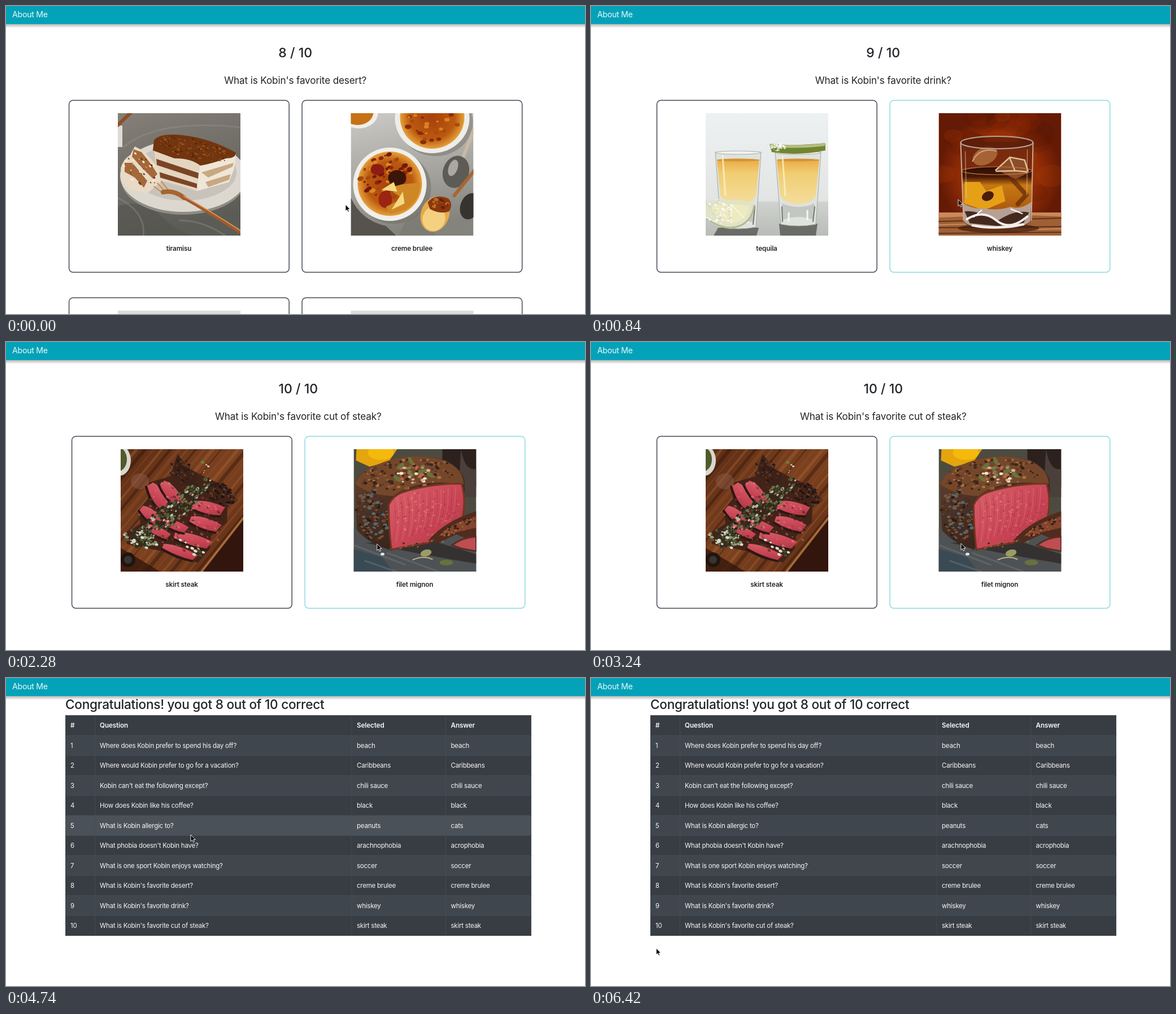
Recreate the animation shown at these times as an HTML page. Size 1025 by 546 pixels, loop 6.48 s.

```html
<!DOCTYPE html>
<html lang="en">
<head>
<meta charset="utf-8">
<title>Quiz</title>
<style>
html, body { margin: 0; width: 100%; height: 100%; overflow: hidden; background: #fff; }
svg { display: block; }
text { font: 400 11.5px Inter, Roboto, sans-serif; letter-spacing: -.02em; fill: #212529; }
.brand { font-size: 14.2px; fill: #e9f8fa; }
.big { font-size: 22.65px; font-weight: 500; letter-spacing: -.012em; }
.count { font-size: 23.1px; letter-spacing: 0; }
.ask { font-size: 17.2px; letter-spacing: -.01em; }
.bold { font-size: 11.7px; font-weight: 600; letter-spacing: -.01em; }
.mid { text-anchor: middle; }
.table text { fill: #f6f7f8; }
.card { fill: #fff; stroke: #474b57; stroke-width: 1.5; }
.card.hover { stroke: #90d9e2; }
</style>
</head>
<body>
<svg id="stage" width="1025" height="546" viewBox="0 0 1025 546">
  <defs>
    <clipPath id="photo"><rect width="217" height="217"/></clipPath>
    <linearGradient id="shade" x2="0" y2="1"><stop stop-color="#000" stop-opacity=".3"/><stop offset="1" stop-color="#000" stop-opacity="0"/></linearGradient>
    <linearGradient id="linen" x2=".3" y2="1"><stop stop-color="#858078"/><stop offset="1" stop-color="#5c5c57"/></linearGradient>
    <linearGradient id="marble" x2=".2" y2="1"><stop stop-color="#cbcac6"/><stop offset=".6" stop-color="#a3a29d"/><stop offset="1" stop-color="#84837c"/></linearGradient>
    <linearGradient id="studio" x2="0" y2="1"><stop stop-color="#eef1f1"/><stop offset=".7" stop-color="#e2e5e4"/><stop offset="1" stop-color="#a9aca8"/></linearGradient>
    <linearGradient id="gold" x2="0" y2="1"><stop stop-color="#e8ad45"/><stop offset=".3" stop-color="#f0cd72"/><stop offset="1" stop-color="#f4dd9c"/></linearGradient>
    <radialGradient id="ember"><stop stop-color="#b03c08"/><stop offset=".6" stop-color="#962f06"/><stop offset="1" stop-color="#641a05"/></radialGradient>
    <radialGradient id="sugar"><stop stop-color="#a8400c"/><stop offset=".7" stop-color="#bb590f"/><stop offset="1" stop-color="#e5a03a"/></radialGradient>
    <linearGradient id="amber" x2="0" y2="1"><stop stop-color="#2a0c05"/><stop offset=".22" stop-color="#4a1907"/><stop offset=".4" stop-color="#c87812"/><stop offset="1" stop-color="#a9560c"/></linearGradient>
    <linearGradient id="board" x2="1" y2="1"><stop stop-color="#5b2c16"/><stop offset=".5" stop-color="#7c4220"/><stop offset="1" stop-color="#5a2b15"/></linearGradient>
    <linearGradient id="rare" x2="1" y2="1"><stop stop-color="#d9606a"/><stop offset=".6" stop-color="#c74354"/><stop offset="1" stop-color="#a63a40"/></linearGradient>
    <linearGradient id="crust" x2=".6" y2="1"><stop stop-color="#6b4630"/><stop offset=".5" stop-color="#4a3024"/><stop offset="1" stop-color="#32211a"/></linearGradient>
  </defs>
</svg>
<script>
const LOOP = 6480, ROW = 35.45, WHO = 'Kobin';
const stage = document.getElementById('stage');

let seed = 7;
const rnd = () => (seed = seed * 16807 % 2147483647) / 2147483647;

const path = (d, fill, more = '') => `<path d="${d}" fill="${fill}" ${more}/>`;
const line = (d, color, width, more = '') => path(d, 'none', `stroke="${color}" stroke-width="${width}" stroke-linecap="round" ${more}`);
const oval = (x, y, rx, ry, fill, more = '') => `<ellipse cx="${x}" cy="${y}" rx="${rx}" ry="${ry}" fill="${fill}" ${more}/>`;
const rect = (x, y, w, h, fill, more = '') => `<rect x="${x}" y="${y}" width="${w}" height="${h}" fill="${fill}" ${more}/>`;
const text = (x, y, s, cls = '') => `<text x="${x}" y="${y}" class="${cls}">${s}</text>`;
const turn = (deg, x, y) => `transform="rotate(${deg} ${x} ${y})"`;

// Crumbs scattered over a rotated ellipse
function crumbs(n, x, y, rx, ry, deg, size, colors) {
  let s = '';
  while (n--) {
    const a = rnd() * 6.283, q = Math.sqrt(rnd()), r = size * (.5 + rnd());
    s += oval((x + rx * q * Math.cos(a)).toFixed(1), (y + ry * q * Math.sin(a)).toFixed(1),
      r.toFixed(1), (r * .7).toFixed(1), colors[n % colors.length]);
  }
  return `<g ${turn(deg, x, y)}>${s}</g>`;
}

const photos = {
  tiramisu: () => rect(0, 0, 217, 217, 'url(#linen)')
    + path('M0 165Q45 150 80 185T150 217H0Z', '#54544e', 'opacity=".6"')
    + line('M10 60Q70 10 217 25M0 150Q50 175 45 217M110 190Q150 190 190 217', '#9a968c', 3, 'opacity=".35"')
    + rect(0, 22, 8, 38, '#dedbd6') + line('M-2 23L24 -2', '#8d4f25', 6)
    + oval(116, 118, 110, 62, '#8f8c85') + oval(116, 111, 112, 64, '#dcd8d0') + oval(118, 105, 92, 50, '#c8c3ba')
    + path('M64 62L146 86L140 138L118 131L70 118Z', '#e4d5bf')
    + path('M146 86L209 72L206 98L197 122L140 138Z', '#efe6d8')
    + path('M68 81L143 106L142 116L69 92ZM72 104L140 125V133L74 114Z', '#7a4526')
    + path('M148 105L205 88L203 95L160 114ZM155 122L200 108L197 118L160 131Z', '#c9a781')
    + path('M64 48Q72 37 100 38Q155 40 209 70Q209 80 192 80Q165 90 146 93Q130 80 100 80L62 66Z', '#71350f')
    + crumbs(130, 134, 63, 66, 17, 13, 1.5, ['#8d4a19', '#54250a', '#a05a22'])
    + path('M5 98Q9 82 22 74L30 59L44 66L56 78L73 99L76 122L52 142L22 136L8 122Z', '#e8dac4')
    + path('M28 64L42 69L60 92L70 108L62 116L42 96L25 77ZM12 88L26 88L52 120L46 132L30 114L12 104Z', '#a4683a')
    + crumbs(30, 40, 100, 34, 25, 40, 1.8, ['#6f3a18', '#f5ecdd'])
    + line('M64 130L80 142M70 124L84 139M77 121L90 137', '#c98d55', 2)
    + line('M80 140Q100 136 117 150', '#a66430', 8) + line('M114 148Q165 177 220 213', '#a45a28', 6)
    + line('M116 147Q165 174 217 208', '#d99a62', 1.5),

  brulee: () => rect(0, 0, 217, 217, 'url(#marble)')
    + path('M0 150Q18 190 62 200L80 217H0Z', '#55534c') + path('M95 195L130 170L150 217H85Z', '#7a7972', 'opacity=".7"')
    + oval(14, 0, 34, 27, '#f0eeea') + oval(12, -2, 28, 23, '#c67116')
    + oval(150, 16, 66, 60, '#77756f', 'opacity=".55"') + oval(144, 9, 66, 62, '#efede9') + oval(144, 7, 57, 56, 'url(#sugar)')
    + crumbs(45, 144, 15, 48, 42, 0, 4, ['#8a2c08', '#d98220', '#a84b0d'])
    + oval(76, 132, 66, 64, '#716f68', 'opacity=".55"') + oval(69, 126, 65, 65, '#f1efeb') + oval(69, 125, 57, 57, 'url(#sugar)')
    + crumbs(70, 60, 112, 47, 40, -20, 4, ['#8e230c', '#d88923', '#a34a0c', '#741908'])
    + oval(82, 115, 16, 14, '#3b1508') + oval(47, 100, 12, 10, '#8d1c12') + oval(61, 153, 12, 15, '#9b2413')
    + path('M72 131L91 126L123 123Q123 154 97 171L70 178L62 166L92 151L76 141Z', '#cf8725')
    + path('M76 122L82 139L54 136ZM92 139L95 160L72 171Z', '#f4d980')
    + line('M196 85L218 28', '#c9b9a2', 6) + oval(186, 104, 23, 29, '#5c5b55', turn(18, 186, 104)) + oval(181, 97, 8, 15, '#aaa8a0', turn(20, 181, 97))
    + line('M183 146L220 100', '#a76635', 6) + oval(211, 165, 17, 24, '#37342f', turn(20, 211, 165))
    + oval(149, 179, 25, 32, '#e6a949', turn(20, 149, 179)) + oval(147, 187, 20, 22, '#f3d181', turn(20, 147, 187))
    + path('M136 158Q148 142 172 151Q182 160 174 174Q158 180 140 170Z', '#8b3710')
    + crumbs(14, 158, 161, 17, 9, 15, 3, ['#6a210b', '#c26c21']),

  tequila: () => {
    const glass = (x, floor) => path(`M${x} 69H${x + 81}L${x + 72} ${floor}Q${x + 41} ${floor + 6} ${x + 10} ${floor}Z`, '#dfe2dd', 'stroke="#a4a8a3"')
      + path(`M${x + 3} 83H${x + 78}L${x + 72} 145Q${x + 66} 161 ${x + 41} 161T${x + 9} 145Z`, 'url(#gold)')
      + oval(x + 40.5, 83, 38, 2.5, '#d69334')
      + path(`M${x + 12} 160Q${x + 41} 172 ${x + 70} 160L${x + 68} ${floor - 8}Q${x + 41} ${floor - 18} ${x + 14} ${floor - 8}Z`, '#c3c7c3')
      + line(`M${x + 12} 166L${x + 13} ${floor - 5}M${x + 70} 166L${x + 67} ${floor - 5}`, '#737875', 2)
      + line(`M${x + 24} ${floor - 20}V${floor - 6}M${x + 57} ${floor - 24}V${floor - 8}`, '#f5f6f4', 3)
      + oval(x + 40.5, 70, 40, 3, '#f0f2f0', 'stroke="#a9aeaa"')
      + line(`M${x + 13} 76L${x + 18} 146`, '#fff2c8', 3, 'opacity=".75"');
    return rect(0, 0, 217, 217, 'url(#studio)') + rect(0, 157, 217, 60, '#c5c8c4', 'opacity=".55"')
      + path('M22 203H94L90 217H14ZM130 196H198L195 217H132Z', '#4f514d', 'opacity=".75"')
      + glass(17, 202) + glass(123, 197)
      + path('M113 55Q165 58 212 53V66Q165 76 117 69Z', '#71852f') + path('M114 54Q165 59 212 53L211 58Q165 64 114 60Z', '#b4bd83')
      + crumbs(34, 127, 61, 14, 7, 0, 1.8, ['#f8f9f5', '#dbe0d2'])
      + path('M0 158Q44 148 88 160Q83 202 44 205Q12 202 0 184Z', '#e1e3c7') + path('M10 165Q45 157 78 165Q72 194 45 195Q18 190 10 165Z', '#edeabf')
      + line('M46 162L45 194M46 162L20 184M46 162L68 186', '#fafaf0', 1.5)
      + line('M2 186Q20 202 44 203Q80 201 86 164', '#b2b98c', 3) + crumbs(60, 22, 175, 25, 24, 20, 1.7, ['#fafbf8', '#d5d9c8']);
  },

  whiskey: () => rect(0, 0, 217, 217, 'url(#ember)')
    + crumbs(24, 108, 80, 110, 82, 0, 24, ['#a8330722', '#48110422', '#c2500c22'])
    + rect(0, 176, 217, 41, '#a06036') + path('M0 176H217V183L130 180L0 185Z', '#c98a58')
    + line('M0 192L217 186M0 203L217 201M0 213L217 211', '#613016', 2) + line('M0 198L100 195M130 207L217 205', '#d09a6c', 1.5)
    + oval(106, 204, 72, 8, '#3e1a0c', 'opacity=".7"')
    + path('M39 51H167L164 190Q160 204 104 205T44 190Z', '#6b2710', 'opacity=".75"')
    + path('M40 102Q103 88 166 102L163 162Q105 190 43 165Z', 'url(#amber)')
    + path('M46 122H73L84 138L112 128L118 156L80 172L45 160Z', '#e6a018')
    + oval(87, 147, 11, 8, '#4a1d08', turn(-25, 87, 147)) + line('M128 115L155 145L140 161', '#63270c', 8, 'opacity=".7"')
    + path('M102 100L126 78L154 84L160 105L136 117Z', '#8a4d29') + line('M101 101L126 78L152 83L158 102M126 80L135 102L102 103M135 102L156 104', '#e3bd96', 2.5)
    + oval(82, 76, 23, 15, '#a56235', turn(-25, 82, 76)) + line('M60 85Q72 60 102 67', '#d9a070', 2)
    + oval(103, 102, 62, 7, 'none', 'stroke="#c17d3f" stroke-width="1.2"')
    + path('M43 160Q64 171 76 168Q103 174 127 166Q145 172 164 157L162 192Q150 204 104 205T45 192Z', '#b7a093')
    + path('M46 174Q70 172 104 191Q135 170 160 176L150 195L104 200L55 195Z', '#45291e')
    + line('M50 188Q78 170 102 190T157 183M60 199Q104 207 150 197', '#f4eee8', 4)
    + line('M76 172L62 184M128 170L148 178', '#fff', 2)
    + oval(103, 52, 64, 11, '#4d1607', 'fill-opacity=".55" stroke="#b7a59a" stroke-width="2.2"')
    + line('M39 53L44 190M167 53L164 190', '#c9aa94', 2) + line('M47 68L49 150M157 65L156 145', '#e7c6a3', 1.5, 'opacity=".55"'),

  skirt: () => {
    const slices = [[66, 83, 25, 13, 58], [90, 78, 25, 12, 50], [53, 117, 21, 11, 40], [155, 104, 29, 12, 12],
      [150, 132, 28, 11, 18], [128, 161, 34, 11, 16], [105, 182, 32, 9, 20], [66, 146, 23, 9, 25], [98, 136, 22, 9, 20]];
    return rect(0, 0, 217, 217, 'url(#board)')
      + Array.from({length: 34}, (_, i) => line(`M${i * 15 - 240} 217L${i * 15 - 60} -2`, ['#a5622f', '#331408', '#8c4c25'][i % 3], 2 + i % 4 * 1.5, 'opacity=".45"')).join('')
      + path('M0 175L70 217H0Z', '#35170c', 'opacity=".8"')
      + path('M217 118L140 217H217Z', '#32150c') + line('M217 122L143 217', '#a56a3a', 4)
      + oval(-2, 20, 20, 27, '#d9d7ce') + oval(-4, 18, 15, 21, '#4f5b2b')
      + oval(34, 57, 16, 14, '#8d5a48', 'opacity=".5"') + oval(13, 196, 13, 13, '#1f1511') + oval(13, 196, 7, 7, '#3a3330')
      + path('M88 48L101 9L119 33L145 47L190 68L207 91L189 103L188 130L160 154L158 176L137 201L100 194L74 181L11 168L8 150L35 132L32 108L48 88L50 59Z', '#432318')
      + slices.map(([x, y, w, h, a]) =>
        path(`M${x - w} ${y - h * .4}Q${x - w * .3} ${y - h * 1.3} ${x + w} ${y - h * .6}L${x + w * .8} ${y + h * .7}Q${x} ${y + h * 1.2} ${x - w} ${y + h * .5}Z`, 'url(#rare)', turn(a, x, y))
        + line(`M${x - w} ${y + h * .7}Q${x} ${y + h * 1.3} ${x + w * .8} ${y + h * .9}`, '#2c1712', 4, turn(a, x, y))).join('')
      + crumbs(150, 105, 118, 80, 58, 30, 2, ['#ef858b88', '#34191588', '#963b3d88', '#e9757f66'])
      + path('M88 45L101 9L119 33L137 46L126 70L104 53Z', '#3c2118')
      + crumbs(70, 178, 80, 28, 19, 25, 2.2, ['#2a1914', '#66402b', '#1d1210'])
      + crumbs(50, 108, 38, 22, 20, 30, 2, ['#2a1914', '#5c3825'])
      + crumbs(290, 90, 112, 92, 19, -40, 2.4, ['#39472c', '#6c7548', '#252d1e', '#b9bda4', '#4d5838', '#2c2a1f'])
      + crumbs(60, 36, 160, 31, 15, 15, 2.5, ['#d8d7c6', '#4f5d34', '#2f3322', '#929a77'])
      + crumbs(18, 125, 176, 36, 10, 25, 2.4, ['#d8dac3', '#3f4c2c'])
      + crumbs(9, 150, 28, 8, 14, 10, 2.2, ['#69803c', '#cfd0b5']);
  },

  filet: () => rect(0, 0, 217, 217, '#4d4b40')
    + path('M5 0H77L62 22L28 31L4 20Z', '#e5a50d') + oval(48, 6, 23, 13, '#f5b90c')
    + rect(157, 0, 60, 67, '#2c211d') + path('M190 0Q197 40 217 35V85H185Z', '#4a3f3a')
    + path('M0 140L60 160L217 140V217H0Z', '#4e5254') + path('M0 177L50 191L70 217H0Z', '#3a4a54')
    + line('M0 170L92 205M60 184L150 217M20 198L75 217', '#737678', 3, 'opacity=".45"')
    + path('M20 166L145 164L217 186V203L120 186Z', '#2b2624', 'opacity=".75"')
    + path('M2 64Q4 48 24 35L70 17Q120 8 160 19Q186 30 196 52L197 76L75 82L64 178Q30 170 6 144Z', 'url(#crust)')
    + path('M3 62Q8 46 30 33Q70 12 115 13Q160 14 181 33Q194 44 195 62Q110 51 70 83Q30 82 3 62Z', '#75472a')
    + crumbs(150, 95, 45, 86, 26, -5, 2.6, ['#3f271b', '#a87243', '#34211a', '#5f3823', '#8a5731'])
    + crumbs(130, 33, 115, 27, 46, -10, 2.6, ['#2c1c16', '#705747', '#536a72', '#4c2c1d', '#7b4d2f'])
    + path('M62 99Q69 83 85 77Q132 61 191 61Q199 90 193 120Q164 148 133 166Q98 171 67 178Q62 140 62 99Z', 'url(#rare)', 'stroke="#76351f" stroke-width="3"')
    + Array.from({length: 18}, (_, i) => line(`M${70 + i * 6.5} ${86 - i * 1.1}Q${78 + i * 6} 118 ${69 + i * 5.8} ${166 - i * 2.2}`, i % 2 ? '#ed8d8d' : '#a52f43', 1.2, 'opacity=".35"')).join('')
    + crumbs(110, 130, 112, 58, 42, -12, 1.8, ['#ee8f9466', '#a52f4366'])
    + path('M132 162Q160 128 217 110V166L182 151L150 166Z', '#512b1e') + path('M151 154Q177 128 217 119V139L179 148Z', '#84452d')
    + crumbs(40, 185, 138, 34, 9, -25, 2, ['#3a2018', '#a4603c'])
    + path('M174 170Q193 156 217 155V181L190 176Z', '#bf4d54', 'stroke="#543021" stroke-width="3"')
    + crumbs(40, 106, 43, 28, 20, 0, 2.5, ['#f2e6d4', '#d2b294', '#718151', '#c36749'])
    + [[83, 30, -35], [77, 52, 38], [121, 39, -20], [136, 46, 28], [101, 21, 62]].map(([x, y, a]) => oval(x, y, 8, 3.5, '#69733c', turn(a, x, y))).join('')
    + crumbs(24, 110, 170, 50, 7, -8, 1.8, ['#94633a', '#463126'])
    + oval(128, 184, 10, 6, '#9b9b66', turn(-15, 128, 184)) + line('M105 196Q124 188 139 195', '#b9b184', 2)
    + oval(164, 201, 12, 5, '#687240') + oval(51, 186, 3.5, 2.5, '#e2e6e5'),
};

function quiz(count, question, x, options) {
  const cards = options.map(([label, photo], i) => {
    const left = x + i * 412.5;
    return rect(left + .6, 167.2, 389.6, 304.8, '', 'rx="7" class="card"')
      + `<g transform="translate(${left + 87} 190)" clip-path="url(#photo)">${photos[photo]()}</g>`
      + text(left + 195, 434, label, 'bold mid');
  }).join('');
  const middle = x + 401.3;
  return text(middle, 91, `${count} / 10`, 'big count mid') + text(middle, 138, `What is ${WHO}'s favorite ${question}?`, 'ask mid') + cards;
}

function results() {
  const rows = [
    [`Where does ${WHO} prefer to spend his day off?`, 'beach'],
    [`Where would ${WHO} prefer to go for a vacation?`, 'Caribbeans'],
    [`${WHO} can't eat the following except?`, 'chili sauce'],
    [`How does ${WHO} like his coffee?`, 'black'],
    [`What is ${WHO} allergic to?`, 'peanuts', 'cats'],
    [`What phobia doesn't ${WHO} have?`, 'arachnophobia', 'acrophobia'],
    [`What is one sport ${WHO} enjoys watching?`, 'soccer'],
    [`What is ${WHO}'s favorite desert?`, 'creme brulee'],
    [`What is ${WHO}'s favorite drink?`, 'whiskey'],
    [`What is ${WHO}'s favorite cut of steak?`, 'skirt steak'],
  ];
  const cells = (y, list, cls) => [114, 166, 621, 787.5].map((x, i) => text(x, y, list[i], cls)).join('');
  return text(105, 55, 'Congratulations! you got 8 out of 10 correct', 'big')
    + '<g class="table">' + rect(105, 66, 825, 391, '#373d43')
    + rows.map((_, i) => i % 2 ? '' : rect(105, 102 + i * ROW, 825, ROW, '#40464e')).join('')
    + rect(105, 0, 825, ROW, '#fff', 'id="rowHover" opacity="0"')
    + rows.map((_, i) => line(`M105 ${102 + i * ROW}H930`, '#474e56', .8)).join('')
    + line('M105.5 66V457M157.5 66V457M612 66V457M778.5 66V457M929.5 66V457', '#474e56', .8)
    + cells(88, ['#', 'Question', 'Selected', 'Answer'], 'bold')
    + rows.map(([q, chosen, answer = chosen], i) => cells(124 + i * ROW, [i + 1, q, chosen, answer])).join('') + '</g>';
}

const scenes = [
  [0, quiz(8, 'desert', 111, [['tiramisu', 'tiramisu'], ['creme brulee', 'brulee']])
    + [111, 523.5].map(x => rect(x + .6, 517.2, 389.6, 304.8, '', 'rx="7" class="card"') + rect(x + 87, 540, 217, 6, '#dcdcdc')).join('')],
  [360, quiz(9, 'drink', 116, [['tequila', 'tequila'], ['whiskey', 'whiskey']])],
  [2280, quiz(10, 'cut of steak', 116, [['skirt steak', 'skirt'], ['filet mignon', 'filet']])],
  [4560, results()],
];

stage.insertAdjacentHTML('beforeend',
  scenes.map(([, body]) => `<g class="scene">${body}</g>`).join('')
  + rect(0, 32, 1025, 7, 'url(#shade)') + rect(0, 0, 1025, 32, '#03a2b9') + text(11, 19.5, 'About Me', 'brand')
  + path('M0 0V11.6L2.7 9.2L4.5 13.2L6.4 12.4L4.7 8.5H8.2Z', '#000', 'id="cursor" stroke="#fff" stroke-width=".9"'));

const groups = [...stage.querySelectorAll('.scene')];
const cards = groups.map(g => [...g.querySelectorAll('.card')]);
const cursor = document.getElementById('cursor');
const rowHover = document.getElementById('rowHover');

// time, x, y of the pointer
const track = [[0, 601, 352], [300, 648, 345], [840, 650, 343], [1440, 650, 343], [2040, 657, 358], [3240, 655, 357],
  [3600, 340, 288], [3840, 327, 278], [5100, 327, 278], [5700, 237, 304], [6360, 121, 456], [6420, 115.5, 479], [LOOP, 115.5, 479]];

function pointer(t) {
  const i = track.findIndex(k => k[0] > t), [t0, x0, y0] = track[i - 1], [t1, x1, y1] = track[i];
  const u = (t - t0) / (t1 - t0), e = u * u * (3 - 2 * u);
  return [x0 + (x1 - x0) * e, y0 + (y1 - y0) * e];
}

function draw(now) {
  const t = now % LOOP, [x, y] = pointer(t);
  const current = scenes.findLastIndex(s => t >= s[0]);
  groups.forEach((g, i) => g.style.display = i === current ? '' : 'none');
  cards[current].forEach((card, i) => {
    const left = +card.getAttribute('x');
    card.classList.toggle('hover', t >= 60 && i < 2 && x > left && x < left + 390);
  });
  const row = Math.floor((y - 102) / ROW);
  rowHover.setAttribute('y', 102 + row * ROW);
  rowHover.setAttribute('opacity', row >= 0 && row < 10 ? .06 : 0);
  cursor.setAttribute('transform', `translate(${x} ${y})`);
  requestAnimationFrame(draw);
}
requestAnimationFrame(draw);
</script>
</body>
</html>
```
